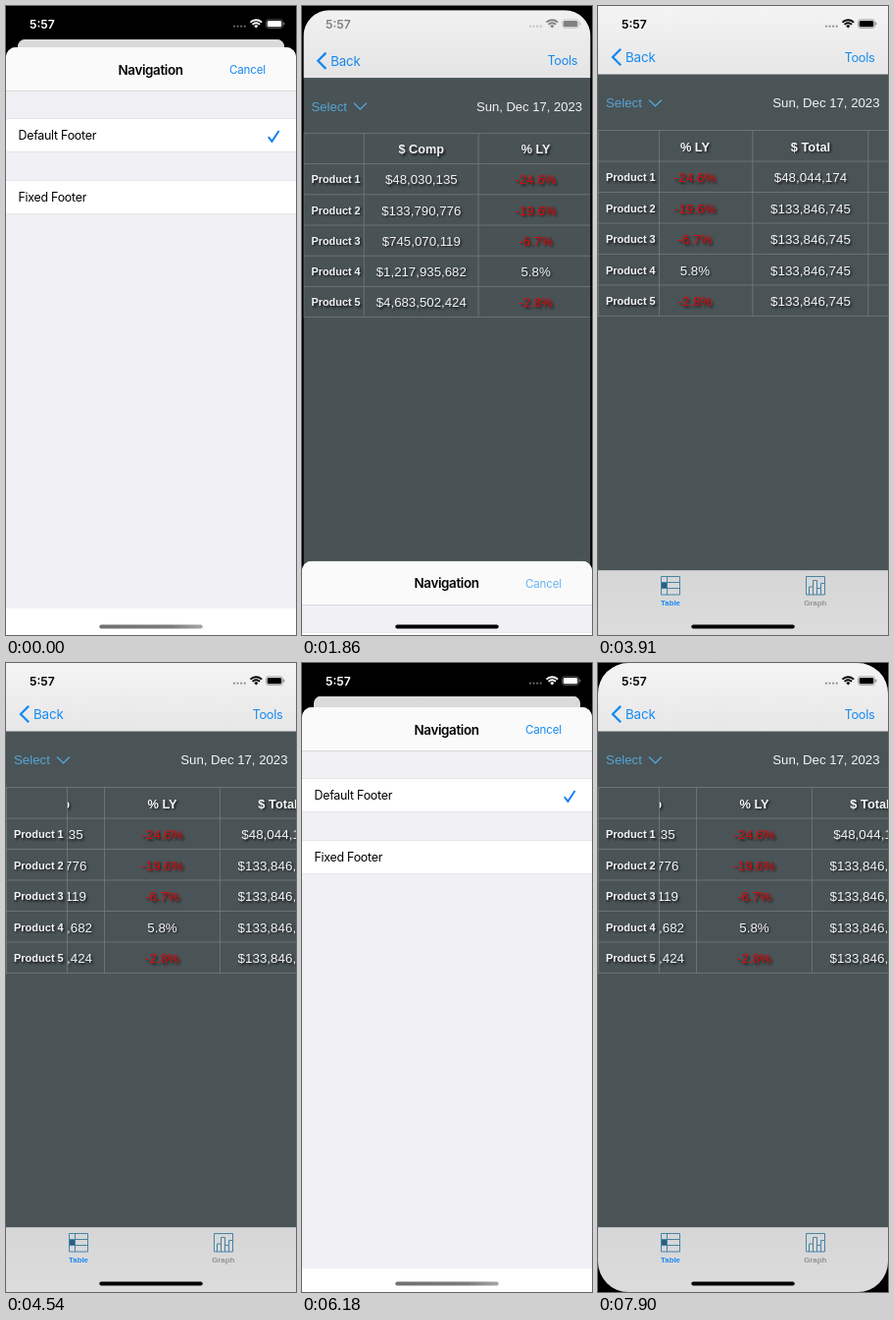
Recreate the animation shown at these times as an HTML page with a canvas. Size 296 by 640 pixels, loop 8000 ms.

```html
<!DOCTYPE html>
<html lang="en">
<head>
<meta charset="utf-8">
<title>Sheet and table</title>
<style>
html, body { margin: 0; width: 100%; height: 100%; overflow: hidden; background: #000; }
canvas { display: block; width: 296px; height: 640px; }
</style>
</head>
<body>
<canvas id="stage"></canvas>
<script>
const W = 296, H = 640, LOOP = 8000;
const UI = 'Inter, sans-serif', HELV = '"Liberation Sans", Arial, sans-serif';
const BLUE = '#168af0', WHITE = '#f4f6f6', RED = '#e00808', SLATE = '#4a5356';
// The picture advances only at these moments.
const TICKS = [0, 1500, 1740, 1860, 1960, 2070, 2180,
  2930, 3040, 3150, 3270, 3380, 3490, 3610, 3910, 4030, 4150, 4270, 4390, 4540,
  5480, 5630, 5750, 5850, 5960, 6070, 6180, 7070, 7340, 7450, 7550, 7670, 7790, 7900];
const COLUMNS = [
  ['$ Comp', '$48,030,135', '$133,790,776', '$745,070,119', '$1,217,935,682', '$4,683,502,424'],
  ['% LY', '-24.6%', '-19.6%', '-6.7%', '5.8%', '-2.8%'],
  ['$ Total', '$48,044,174', '$133,846,745', '$133,846,745', '$133,846,745', '$133,846,745']
];
const COL_X = 62, COL_W = 118, TOP = 126.5, ROW_H = 31.5;

const canvas = document.getElementById('stage');
const ctx = canvas.getContext('2d');
const dpr = window.devicePixelRatio || 1;
canvas.width = W * dpr;
canvas.height = H * dpr;

const clamp = x => Math.min(1, Math.max(0, x));
const smooth = x => { x = clamp(x); return x * x * (3 - 2 * x); };
const ramp = (t, start, length) => clamp((t - start) / length);
// Critically damped spring, 1 -> 0.
const spring = (t, start, rate) => {
  const x = Math.max(0, t - start) / 1000 * rate;
  return (1 + x) * Math.exp(-x);
};

function text(s, x, y, font, color, align = 'left', spacing = 0) {
  ctx.font = font;
  ctx.fillStyle = color;
  ctx.textAlign = align;
  ctx.letterSpacing = spacing + 'px';
  ctx.fillText(s, x, y);
}

function rect(x, y, w, h, color) {
  ctx.fillStyle = color;
  ctx.fillRect(x, y, w, h);
}

function round(x, y, w, h, r, color) {
  ctx.beginPath();
  ctx.roundRect(x, y, w, h, r);
  ctx.fillStyle = color;
  ctx.fill();
}

function stroke(path, color, width) {
  ctx.strokeStyle = color;
  ctx.lineWidth = width;
  ctx.stroke(new Path2D(path));
}

function faded(alpha, draw) {
  ctx.save();
  ctx.globalAlpha = alpha;
  draw();
  ctx.restore();
}

function gradient(y0, y1, a, b) {
  const g = ctx.createLinearGradient(0, y0, 0, y1);
  g.addColorStop(0, a);
  g.addColorStop(1, b);
  return g;
}

function sheetOpen(t) {
  if (t < 5600) return t < 1740 ? 1 : spring(t, 1660, 18);
  return t < 7350 ? 1 - spring(t, 5610, 13) : spring(t, 7363, 18);
}

// 0 = black status text, 1 = white
function statusLight(t) {
  if (t < 5600) return 1 - ramp(t, 1660, 400);
  return t < 7340 ? ramp(t, 5650, 400) : 1 - ramp(t, 7363, 400);
}

const scrollAt = t => 141.5 * smooth((t - 2920) / 690) - 61.5 * smooth((t - 3860) / 680);
const pressed = (t, down, up, length) => t < down ? 1 : 0.3 + 0.7 * ramp(t, up, length);

function drawTable(scroll) {
  const rowY = i => TOP + ROW_H * i;
  const line = '#737b7e';
  const shade = () => {
    ctx.shadowColor = 'rgba(0,0,0,.75)';
    ctx.shadowBlur = 2.5 * dpr;
    ctx.shadowOffsetX = ctx.shadowOffsetY = 1.5 * dpr;
  };
  for (let i = 0; i <= 6; i++) rect(0, rowY(i) - 0.4, W, 0.8, line);
  rect(0, TOP, 0.8, ROW_H * 6, line);
  rect(COL_X, TOP, 0.8, ROW_H * 6, line);

  ctx.save();
  shade();
  for (let i = 1; i <= 5; i++)
    text('Product ' + i, 8, rowY(i) + 20, `bold 11px ${HELV}`, WHITE);
  ctx.restore();

  ctx.save();
  ctx.beginPath();
  ctx.rect(COL_X + 0.8, TOP - 1, W, ROW_H * 6 + 2);
  ctx.clip();
  for (let c = 1; c <= 3; c++) rect(COL_X + c * COL_W - scroll, TOP, 0.8, ROW_H * 6, line);
  shade();
  COLUMNS.forEach((cells, c) => cells.forEach((cell, i) => {
    const x = COL_X + (c + 0.5) * COL_W - scroll + 0.5;
    const font = i ? `13.4px ${HELV}` : `bold 12.8px ${HELV}`;
    text(cell, x, rowY(i) + 21, font, cell[0] === '-' ? RED : WHITE, 'center');
  }));
  ctx.restore();
}

function drawTabs() {
  const ink = '#4684a5';
  rect(0, 574, W, 66, gradient(574, 640, '#d6d6d7', '#dcdcdd'));
  rect(0, 574, W, 0.6, '#b4b6b7');
  stroke('M64.5 580.5h19v18.5h-19zM70.5 580.5v18.5M64.5 586.5h19M64.5 592.5h19', ink, 1);
  rect(65, 587, 5, 5, '#2c5f7d');
  text('Table', 74, 610, `bold 7.8px ${HELV}`, '#168af0', 'center');
  stroke('M212.5 580.5h19v18.5h-19zM215.5 599v-8h4v8M219.5 591v-6.5h4v14.5M223.5 592.5h4v6.5M227.5 592v-4.5h3.5', ink, 1);
  text('Graph', 221.7, 610, `bold 7.8px ${HELV}`, '#919394', 'center');
}

function drawMain(t, open) {
  const still = t >= 2180 && t < 5630;
  const scale = 1 - 0.081 * open;
  ctx.save();
  ctx.translate(W / 2, 34 * open);
  ctx.scale(scale, scale);
  ctx.translate(-W / 2, 0);
  ctx.beginPath();
  ctx.roundRect(0, 0, W, H, still ? 0 : 8 + 23 * (1 - open) ** 1.5);
  ctx.clip();

  rect(0, 0, W, H, SLATE);
  rect(0, 0, W, 69.5, gradient(0, 69, '#f4f4f4', '#e7e7e8'));
  stroke('M23.2 43.8L15 52l8.2 8.2', BLUE, 2.3);
  text('Back', 28, 57, `13.4px ${UI}`, BLUE, 'left', -0.15);
  text('Tools', 251.5, 56.8, `12.8px ${UI}`, BLUE, 'left', -0.3);

  faded(pressed(t, 5480, 5630, 400), () => {
    text('Select', 8, 103.3, `13.3px ${HELV}`, '#55a5d6');
    stroke('M52 95.5l6.5 6.3l6.5 -6.3', '#55a5d6', 1.3);
  });
  text('Sun, Dec 17, 2023', 287.5, 103.3, `13.2px ${HELV}`, WHITE, 'right');
  drawTable(scrollAt(t));
  drawTabs();
  rect(0, 0, W, H, `rgba(0,0,0,${0.1 * open})`);
  ctx.restore();
}

function drawStatus(light) {
  const v = Math.round(255 * light), color = `rgb(${v},${v},${v})`;
  text('5:57', 24, 22.6, `600 12.2px ${UI}`, color);
  faded(0.4, () => {
    for (let i = 0; i < 4; i++) round(231.8 + i * 3.6, 19.6, 2.2, 2.2, 1.1, color);
  });
  // Wi-Fi fan
  ctx.strokeStyle = color;
  ctx.lineWidth = 1.9;
  for (const r of [8, 5]) {
    ctx.beginPath();
    ctx.arc(255.3, 22.2, r, -Math.PI * 0.76, -Math.PI * 0.24);
    ctx.stroke();
  }
  ctx.fillStyle = color;
  ctx.fill(new Path2D('M255.3 22.4l-2.1 -2.2q2.1 -1.7 4.2 0z'));
  // Battery
  faded(0.4, () => {
    ctx.beginPath();
    ctx.roundRect(265.5, 13.8, 17, 8.6, 2.5);
    ctx.lineWidth = 0.8;
    ctx.stroke();
    round(283.2, 16.6, 1.2, 3, 0.6, color);
  });
  round(266.7, 15, 14.6, 6.2, 1.5, color);
}

const drawCheck = y => stroke(`M267.8 ${y + 1}l3.6 4.6l7.2 -10.8`, '#127ff0', 2);

function drawSheet(t, open) {
  if (open < 0.003) return;
  ctx.save();
  ctx.translate(0, (H - 42) * (1 - open));
  ctx.beginPath();
  ctx.roundRect(0, 42, W, H, 10);
  ctx.clip();
  rect(0, 42, W, H, '#f1f1f5');
  rect(0, 42, W, 44.5, '#fafafa');
  rect(0, 86.2, W, 0.7, '#cfcfd2');
  rect(0, 613, W, 70, '#fff');

  text('Navigation', 114.5, 69.6, `600 13.4px ${UI}`, '#000', 'left', -0.35);
  faded(pressed(t < 5000 ? t : 0, 1500, 1740, 250), () =>
    text('Cancel', 228, 69.2, `11.6px ${UI}`, BLUE, 'left', -0.2));

  const row = (label, y, fill, checked) => {
    rect(0, y, W, 34.5, '#dcdce0');
    rect(0, y + 0.6, W, 33.3, fill);
    text(label, 12.5, y + 21.8, `12.4px ${UI}`, '#000', 'left', -0.25);
    if (checked) drawCheck(y + 18);
  };
  row('Default Footer', 114.2, '#fff', true);
  row('Fixed Footer', 177.3, t >= 7070 && t < 7340 ? '#d1d1d6' : '#fff', t >= 7340);
  ctx.restore();
}

function drawHome(t) {
  const grey = t < 1740 || (t >= 5630 && t < 7340);
  let color = '#000';
  if (grey) {
    color = ctx.createLinearGradient(95, 0, 201, 0);
    color.addColorStop(0, '#707070');
    color.addColorStop(0.7, '#7c7c7c');
    color.addColorStop(1, '#a8a8a8');
  }
  round(95.3, 629.6, 105.4, 4, 2, color);
}

function draw(time) {
  const t = TICKS.filter(tick => tick <= time).pop();
  const open = sheetOpen(t);
  ctx.setTransform(dpr, 0, 0, dpr, 0, 0);
  rect(0, 0, W, H, '#000');
  drawMain(t, open);
  drawStatus(statusLight(t));
  drawSheet(t, open);
  drawHome(t);
}

const start = performance.now();
function frame() {
  draw((performance.now() - start) % LOOP);
  requestAnimationFrame(frame);
}
frame();
</script>
</body>
</html>
```
